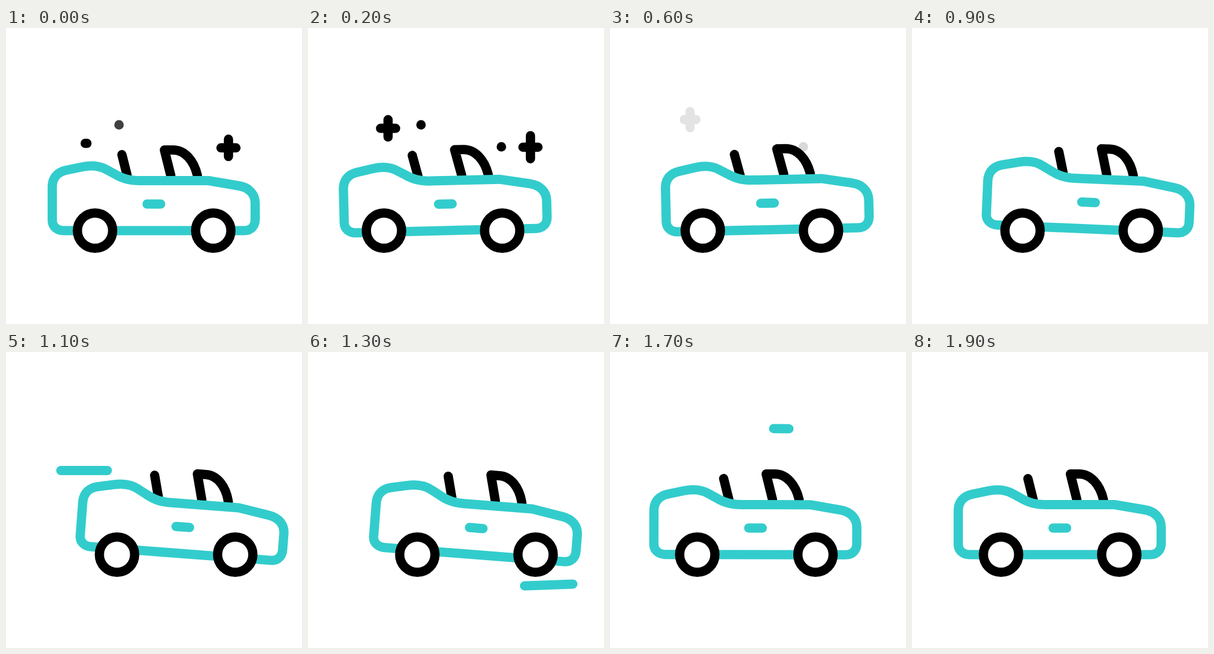
Recreate the animation shown at these times as an HTML page. Size 512 by 512 pixels, loop 2000 ms.

```html
<!DOCTYPE html>
<html lang="en">
<head>
<meta charset="utf-8">
<title>Convertible</title>
<style>
  html, body { margin: 0; width: 100%; height: 100%; overflow: hidden; background: #fff; }
  svg { display: block; width: 100%; height: 100%; fill: none; stroke-width: 16; stroke-linecap: round; stroke-linejoin: round; }
  .black { stroke: #000; }
  .teal { stroke: #33cccc; }
  .wheel { fill: #fff; }
</style>
</head>
<body>
<svg viewBox="0 0 512 512">
  <path id="plusLeft" class="black"/>
  <path id="plusRight" class="black"/>
  <circle id="dotLeft" cx="195.5" cy="167.5" r="8.2" fill="#000"/>
  <circle id="dotRight" cx="334.5" cy="205.5" r="8.2" fill="#000"/>
  <path id="streakBack" class="teal"/>
  <path id="streakBottom" class="teal"/>
  <path id="streakTop" class="teal"/>
  <g id="body">
    <path class="black" d="M200.5 219 209.5 255M285 255 274 211H289C309 211 325 229 331 255"/>
    <path class="teal" d="M80 333V275C80 258 90 249 104 246L133 240C148 237 162 238 174 245L187 252C202 261 214 264 232 264H350L403 273C421 276 431 288 431 303V331C431 343 423 350.5 412 350.5H100C88 350.5 80 343 80 333ZM244 304.5H267.5"/>
  </g>
  <g id="wheels" class="black">
    <circle class="wheel" cx="154" cy="350.5" r="30.5"/>
    <circle class="wheel" cx="358.5" cy="350.5" r="30.5"/>
  </g>
</svg>
<script>
const LOOP = 2000, STEP = 100;
const set = (id, name, value) => document.getElementById(id).setAttribute(name, value);
const ramp = (t, from, to) => Math.min(1, Math.max(0, (t - from) / (to - from)));
const ease = (t, from, to) => (1 - Math.cos(Math.PI * ramp(t, from, to))) / 2;

// The car backs up, lunges forward, returns a little too far and settles.
function drawCar(t) {
  const wheels = -25 * ease(t, 0, 250) + 63 * ease(t, 250, 950) - 43 * ease(t, 1250, 1550) + 5 * ease(t, 1550, 1900);
  const x = -20 * ease(t, 0, 250) + 70 * ease(t, 250, 930) - 55 * ease(t, 1130, 1620) + 5 * ease(t, 1620, 1900);
  const y = -3 * ease(t, 300, 900) + 3 * ease(t, 950, 1300);
  const tilt = -2.3 * ease(t, 0, 350) + 6.9 * ease(t, 400, 1200) - 4.6 * ease(t, 1250, 1750);
  set('wheels', 'transform', `translate(${wheels} 0)`);
  set('body', 'transform', `translate(${x} ${y}) rotate(${tilt} 255.5 304.5)`);
}

// A plus grows out of a dot, then rises, shrinks and fades.
function drawPlus(id, x, baseY, t) {
  const leave = ease(t, 400, 600);
  const y = baseY - 27 * ease(t, 0, 230) - 14 * leave;
  const w = 1.5 + 11.5 * ease(t, 0, 200) - 3 * leave;
  const h = 20 * ease(t, 0, 300) - 6 * leave;
  set(id, 'd', `M${x - w} ${y}h${2 * w}M${x} ${y - h}v${2 * h}`);
  set(id, 'opacity', 1 - ramp(t, 400, 625));
}

function drawDot(id, t, fadeIn, fadeOut) {
  set(id, 'opacity', ramp(t, fadeIn, fadeIn + 200) - ramp(t, fadeOut, fadeOut + 200));
}

// A streak runs leftwards: its head leaves first, its tail follows.
function drawStreak(id, x, y, rise, t) {
  const head = ramp(t, 0, 280), tail = ramp(t, 133, 388);
  const point = u => `${x - 178 * u} ${y + rise * u}`;
  set(id, 'd', head > 0 && tail < 1 ? `M${point(tail)}L${point(head)}` : '');
}

function draw(t) {
  drawCar(t);
  drawPlus('plusLeft', 138.5, 199.5, t);
  drawPlus('plusRight', 384.8, 233.2, t + 200);
  drawDot('dotLeft', t, -150, 320);
  drawDot('dotRight', t, 0, 430);
  drawStreak('streakBack', 222, 205, 0, t - 900);
  drawStreak('streakBottom', 470, 401, 6.5, t - 1150);
  drawStreak('streakTop', 461, 135, -2.5, t - 1350);
}

function frame() {
  const t = performance.now() % LOOP;
  draw(Math.floor(t / STEP) * STEP);
  requestAnimationFrame(frame);
}
frame();
</script>
</body>
</html>
```
